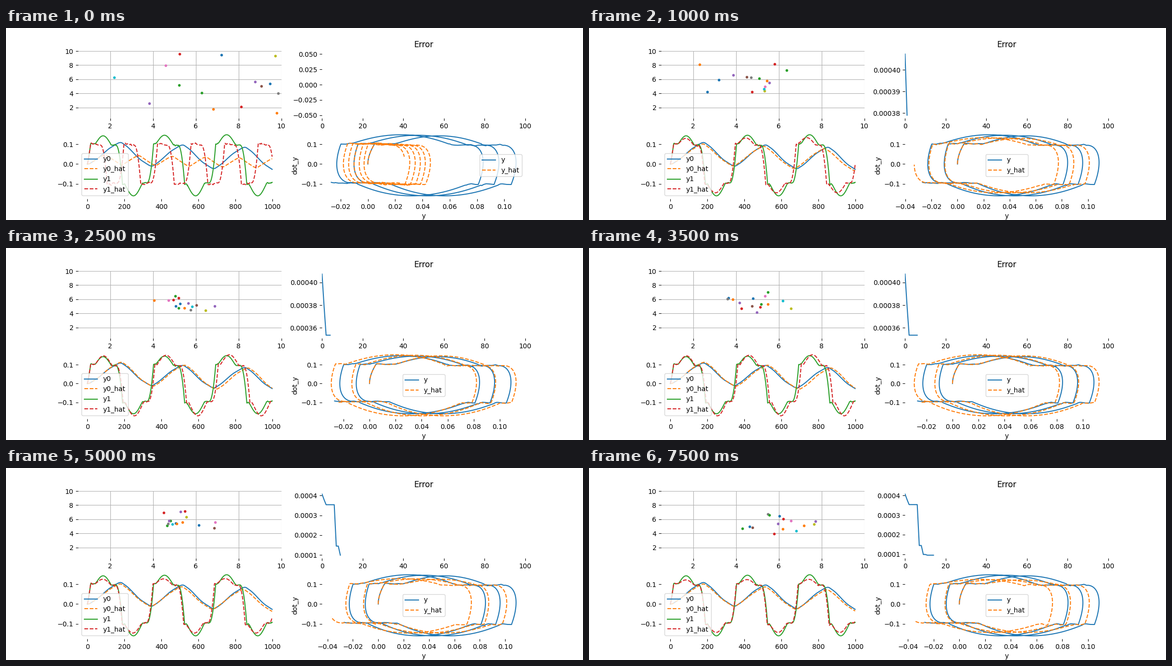
Recreate the animation shown at these times as a matplotlib script. Size 1200 px wide and 400 px high, loop 8 s.

```python
import numpy as np
import matplotlib.pyplot as plt
from matplotlib.animation import FuncAnimation

FRAMES, INTERVAL = 16, 500
STEPS, DT, DRIFT = 1000, 0.006116, 0.0035
PARTICLES = 15
t = np.arange(float(STEPS))


def wave(stretch, up, down, seed):
    """Stick-slip oscillation: velocity sticks at +-0.1, bulges, then flips."""
    rng = np.random.default_rng(seed)
    noise = np.interp(t, t[::5], rng.normal(0, 0.002, STEPS // 5))
    v = np.zeros(STEPS)
    start, end, i = 0, 180 * stretch, 0
    while start < STEPS:
        hit, foot = (10, 22) if i else (18, 42)
        level = np.interp(t, [start + hit, end - 26], [0.103, 0.095])
        height = down * 0.061 if i % 2 else up * (0.0435 + 0.00125 * i)
        u = np.clip((t - start - foot) / (end - start - foot - 50), 0, 1)
        bump = height * np.abs(np.sin(np.pi * u)) ** 1.1
        flip = np.clip((t - end + 26) / 36, 0, 1) ** 2.2
        stuck = (bump < 0.0045) & (flip == 0)
        half = level + bump + noise * stuck - 0.198 * flip
        part = (t >= start + hit) & (t <= end + 10)
        v[part] = (-1) ** i * half[part]
        start, end, i = end, end + 168 * stretch, i + 1
    rise = t < 18
    v[rise] = 0.103 * (t[rise] / 18) ** 1.2
    return DT * np.cumsum(v - DRIFT), v


def swarm_path(seed=4):
    """Particles pulled towards a slowly moving optimum."""
    rng = np.random.default_rng(seed)
    pos = rng.uniform(0.5, 10, (PARTICLES, 2))
    vel = np.zeros_like(pos)
    path = [pos]
    for k in range(1, FRAMES):
        goal = np.array([5 + k / FRAMES, 5.5])
        pull = rng.uniform(0.4, 1.4, pos.shape)
        vel = 0.3 * vel + pull * (goal - pos) + rng.normal(0, 0.7, pos.shape)
        pos = pos + vel
        path.append(pos)
    return path


# Frame of each improvement: period stretch, upper and lower bulge, error.
improvements = {
    0: (0.54, 0.08, 0.06, None),
    1: (0.97, 0.66, 0.72, 0.0004073),
    2: (0.98, 0.70, 0.75, 0.000379),
    3: (1.02, 1.10, 1.18, 0.0003536),
    8: (1.01, 1.05, 1.08, 0.0001445),
    10: (0.99, 0.60, 0.77, 0.0000985),
    12: (0.995, 0.52, 0.72, 0.000095),
}


def best_at(k):
    return max(s for s in improvements if s <= k)


real = wave(1, 1, 1, seed=1)
models = {k: wave(*p[:3], seed=k + 2) for k, p in improvements.items()}
errors = [improvements[best_at(k)][3] for k in range(1, FRAMES)]
path = swarm_path()

fig, axes = plt.subplots(2, 2, figsize=(12, 4), dpi=100)
(ax_swarm, ax_err), (ax_time, ax_phase) = axes


def update(k):
    for ax in axes.flat:
        ax.clear()
        ax.set_frame_on(False)

    for x, y in path[k]:
        ax_swarm.plot(x, y, '.')
    ax_swarm.set(xlim=(0.5, 10), ylim=(0.5, 10))
    ax_swarm.grid(True)

    ax_err.plot(range(k), errors[:k])
    ax_err.set_xlim(0, 100)
    ax_err.set_title('Error')

    y, v = real
    y_hat, v_hat = models[best_at(k)]
    ax_time.plot(t, y, label='y0')
    ax_time.plot(t, y_hat, '--', label='y0_hat')
    ax_time.plot(t, v, label='y1')
    ax_time.plot(t, v_hat, '--', label='y1_hat')
    ax_time.legend(loc='lower left')

    ax_phase.plot(y, v, label='y')
    ax_phase.plot(y_hat, v_hat, '--', label='y_hat')
    ax_phase.set(xlabel='y', ylabel='dot_y')
    ax_phase.legend(loc='center' if k else 'center right')
    return []


anim = FuncAnimation(fig, update, frames=FRAMES, init_func=lambda: update(0),
                     interval=INTERVAL, repeat=True, repeat_delay=0)
plt.show()
```
